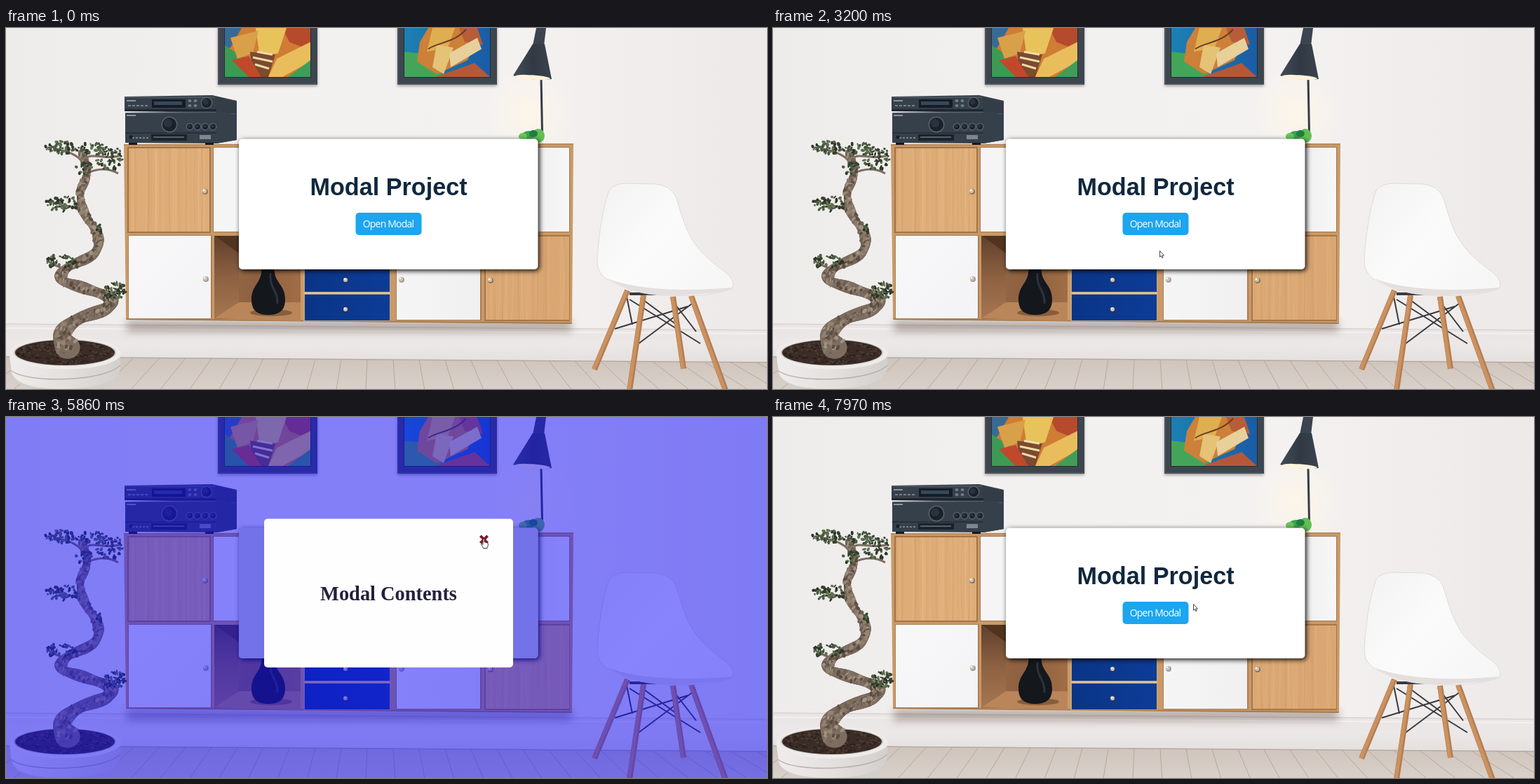
These frames come from a looping animation (1085 px wide and 516 px high, 8 s). An HTML page with a canvas:

```html
<!DOCTYPE html>
<html lang="en">
<head>
<meta charset="utf-8">
<title>Modal Project</title>
<style>
html, body { margin: 0; width: 100%; height: 100%; overflow: hidden; background: #eeecea; }
canvas { display: block; }
</style>
</head>
<body>
<canvas id="stage" width="1085" height="516"></canvas>
<script>
const W = 1085, H = 516, LOOP = 8000;
const stage = document.getElementById('stage').getContext('2d');
let g = stage;
let seed = 7;
const rnd = () => (seed = seed * 16807 % 2147483647) / 2147483647;

function layer(draw) {
  const c = document.createElement('canvas');
  c.width = W; c.height = H;
  g = c.getContext('2d');
  draw();
  g = stage;
  return c;
}
function rect(x, y, w, h, fill) { g.fillStyle = fill; g.fillRect(x, y, w, h); }
function round(x, y, w, h, r, fill) {
  g.fillStyle = fill;
  g.beginPath(); g.roundRect(x, y, w, h, r); g.fill();
}
function oval(x, y, rx, ry, fill, turn = 0) {
  g.fillStyle = fill;
  g.beginPath(); g.ellipse(x, y, rx, ry, turn, 0, 7); g.fill();
}
function shape(d, fill, stroke, width = 1) {
  const p = new Path2D(d);
  if (fill) { g.fillStyle = fill; g.fill(p); }
  if (stroke) { g.strokeStyle = stroke; g.lineWidth = width; g.stroke(p); }
}
function fade(x0, y0, x1, y1, ...colors) {
  const f = g.createLinearGradient(x0, y0, x1, y1);
  colors.forEach((c, i) => f.addColorStop(i / (colors.length - 1), c));
  return f;
}
function glow(x, y, r, inner, outer) {
  const f = g.createRadialGradient(x, y, 0, x, y, r);
  f.addColorStop(0, inner); f.addColorStop(1, outer);
  rect(x - r, y - r, 2 * r, 2 * r, f);
}
function text(s, x, y, font, color, spacing = '0px') {
  g.font = font; g.fillStyle = color; g.textAlign = 'center';
  g.letterSpacing = spacing;
  g.fillText(s, x, y);
}

function room() {
  rect(0, 0, W, H, fade(0, 0, W, 0, '#eeeceb', '#f3f1f0', '#f4f2f1', '#ece9e8'));
  glow(748, 120, 65, 'rgba(255,246,230,.8)', 'rgba(255,246,230,0)');
  // skirting and floor
  shape('M0 423 L1085 432 V478 L0 470Z', fade(0, 424, 0, 478, '#e9e5e4', '#ece8e7', '#e4e0de'));
  shape('M0 423 L1085 432', null, '#d8d3d1', 1.5);
  shape('M0 429 L1085 437', null, '#f3f0ef', 2);
  shape('M0 470 L1085 478 V516 H0Z', fade(0, 470, 0, 516, '#cec4bc', '#d9d0c9'));
  shape('M0 470 L1085 478', null, '#b5aaa2', 1.5);
  for (let x = -40; x < 1130; x += 37) {
    const lean = (x - 530) * .13, top = 470 + x * .0074;
    shape(`M${x} ${top} L${x + lean} 516`, null, '#b0a59c', .9);
  }
  g.save();
  g.filter = 'blur(6px)';
  rect(172, 418, 634, 16, 'rgba(95,75,65,.42)');
  g.restore();
}

function wood(x, y, w, h, base) {
  rect(x, y, w, h, base);
  g.save();
  g.beginPath(); g.rect(x, y, w, h); g.clip();
  for (let i = 0; i < w / 3; i++) {
    const gx = x + rnd() * w, bend = rnd() * 8 - 4;
    shape(`M${gx} ${y} q${bend} ${h / 2} 0 ${h}`, null,
      rnd() < .5 ? 'rgba(190,130,80,.09)' : 'rgba(245,210,165,.12)', 2);
  }
  g.restore();
}
function knob(x, y) {
  oval(x + 1, y + 1, 4, 4, 'rgba(70,50,40,.45)');
  oval(x, y, 3, 3, '#cbc4ba');
  oval(x - 1, y - 1, 1.2, 1.2, '#fff');
}
function cabinet() {
  shape('M168 166 L809 165 L807 423 L171 417Z', '#c99a68');
  shape('M168 167 L809 166', null, '#b5875a', 1.5);
  shape('M172 416 L806 422', null, '#a77b50', 2);
  rect(173, 170, 119, 123, '#a47348');
  wood(175, 172, 115, 119, '#deac77');
  rect(295, 170, 509, 122, '#a1764f');
  rect(296, 171, 120, 120, '#f6f5f6');
  rect(690, 171, 113, 120, fade(758, 0, 803, 0, '#f1f0f0', '#f8f7f7'));
  rect(174, 296, 120, 120, '#ad8056');
  rect(175, 297, 117, 118, fade(175, 297, 292, 415, '#f9f8f9', '#f3f2f4'));
  // open shelf with vase
  rect(297, 297, 123, 119, fade(297, 0, 420, 0, '#9a6b47', '#8d6040', '#a06d45'));
  shape('M297 297 L332 322 V392 L297 415Z', fade(0, 297, 0, 415, '#5f402b', '#8d6142', '#a57650'));
  shape('M297 297 H420 L416 322 H332Z', '#51341f');
  shape('M297 415 L332 392 H420 V419Z', '#b98559');
  oval(378, 407, 30, 5, 'rgba(60,35,15,.4)');
  shape('M364 340 H383 C380 364 398 365 398 388 C398 405 388 410 374 410 C360 410 350 405 350 388 C350 366 367 364 364 340Z', '#14171c');
  shape('M377 350 C375 372 388 374 387 394', null, '#2c333c', 3);
  // lower right half
  rect(424, 300, 124, 119, '#c4a47c');
  rect(426, 300, 121, 77, fade(426, 0, 547, 0, '#0a3586', '#0d3c97'));
  rect(426, 381, 121, 37, fade(426, 0, 547, 0, '#0a3586', '#0d3c97'));
  rect(425, 378, 123, 2, '#dcc49c');
  rect(556, 297, 122, 121, '#a97d55');
  rect(557, 297, 119, 120, fade(557, 0, 677, 0, '#f6f5f6', '#f1f0f1'));
  rect(682, 296, 122, 123, '#a87645');
  wood(684, 298, 119, 119, '#daa773');
  [[283, 233], [284, 358], [484, 360], [484, 402], [563, 359], [690, 360]].forEach(k => knob(...k));
}

function dial(x, y, r) {
  oval(x, y, r + 1.5, r + 1.5, '#56616c');
  oval(x, y, r, r, '#1b2129');
  oval(x - r * .2, y - r * .2, r * .6, r * .6, '#2a333d');
}
function stereo() {
  shape('M169 98 L294 96 L329 104 V123 L300 121 L169 119Z', '#36404b');
  shape('M299 98 L329 108 V122 L299 119Z', '#333d48');
  shape('M169 99 H298', null, '#5c6670', 1);
  rect(170, 116, 130, 3, '#20262e');
  rect(208, 102, 48, 12, '#161c24');
  rect(211, 105, 40, 5, '#34495a');
  for (let i = 0; i < 5; i++) rect(174 + i * 6, 110, 4, 2, '#77818b');
  for (let i = 0; i < 4; i++) oval(262 + i % 2 * 8, 104 + (i >> 1) * 7, 2.5, 2, '#707d88');
  rect(172, 103, 13, 2, '#8d969f');
  dial(286, 107, 7);
  shape('M170 121 L300 120 L329 123 V160 L300 165 L170 164Z', '#36404b');
  shape('M300 120 L329 124 V160 L300 165Z', '#35404b');
  shape('M170 121.5 L300 120.5', null, '#59646f', 1);
  rect(172, 124, 13, 2, '#8d969f');
  rect(170, 149, 130, 2, '#29313a');
  dial(233, 138, 10);
  for (let i = 0; i < 4; i++) dial(262 + i * 11, 141, 4);
  rect(207, 152, 51, 9, '#1b222a');
  rect(210, 155, 44, 2, '#55616c');
  rect(276, 153, 16, 6, '#7c8791');
  for (let i = 0; i < 5; i++) rect(180 + i * 5, 156, 3, 2, '#77818b');
  oval(178, 156, 2.5, 2.5, '#181e25');
  rect(175, 164, 12, 3, '#15191f');
  rect(284, 164, 12, 3, '#15191f');
}

function frame(x, paint) {
  g.save();
  g.shadowColor = 'rgba(60,50,45,.45)'; g.shadowBlur = 4; g.shadowOffsetY = 2;
  rect(x, -10, 142, 91, '#3d464f');
  g.restore();
  shape(`M${x + 1} 0 V80 H${x + 141}`, null, '#4f5963', 1.5);
  g.save();
  g.beginPath(); g.rect(x + 10, 0, 122, 70); g.clip();
  g.translate(x + 10, 0);
  paint();
  g.restore();
  g.strokeStyle = '#252c34'; g.lineWidth = 1;
  g.strokeRect(x + 9.5, -2, 123, 72.5);
}
// loose colour fields only
function warmPaint() {
  rect(0, 0, 122, 70, '#cf7c35');
  shape('M0 0 H24 L8 28 L0 30Z', '#386a94');
  shape('M0 25 L30 44 L40 70 H0Z', '#3c9a54');
  shape('M82 0 H122 V32 L92 20Z', '#b64a2c');
  shape('M44 0 H88 L76 36 L50 42Z', '#e8c25a');
  shape('M8 14 L48 4 L40 36 L18 44Z', '#d9a04a');
  shape('M36 34 L72 38 L62 70 H40Z', '#7b4a31');
  shape('M74 44 L122 20 V48 L82 70 H62Z', '#e9bd5c');
  shape('M90 70 L122 46 V70Z', '#3f9d58');
  shape('M10 46 L34 40 L52 70 H34Z', '#c0492c');
  shape('M46 34 l22 4 M40 42 l28 6 M43 52 l20 6', null, '#f0dca6', 3);
}
function coolPaint() {
  rect(0, 0, 122, 70, fade(0, 0, 122, 0, '#1c80b4', '#1a5ca5'));
  shape('M0 34 L38 38 L56 70 H0Z', '#44a55a');
  shape('M44 70 L100 50 L122 70Z', '#b5583a');
  shape('M34 0 H80 L104 16 L90 46 L46 66 L18 48 L22 20Z', '#cc8038');
  shape('M40 0 H72 L62 28 L32 34Z', '#dfae50');
  shape('M78 0 H104 L112 24 L86 20Z', '#b75d38');
  shape('M46 24 L70 28 L56 66 L40 56Z', '#e4c276');
  shape('M64 36 L104 14 L110 30 L66 56Z', '#e8d09a');
  shape('M34 30 C48 20 70 22 88 2', null, '#693c27', 2);
}

function lamp() {
  shape('M763 72 L764.5 150', null, '#343c45', 3);
  shape('M756 0 H770 L767 25 H751Z', '#3b444f');
  shape('M751 23 H768 L778 73 Q750 76 723 68Z', fade(724, 0, 778, 0, '#424c58', '#313943', '#3a434e'));
  oval(751, 70.5, 25, 3.2, '#fff3dc', .07);
  oval(746, 157, 13, 10, '#3aa34b');
  oval(759, 154, 9, 10, '#61bf54');
  oval(737, 155, 6, 5, '#6ac65c');
  oval(752, 151, 6, 5, '#207d43');
}

function leaves(x, y, rx, ry, n) {
  const greens = ['#35402f', '#4b5a42', '#5f7050', '#2b3526'];
  for (let i = 0; i < n; i++) {
    const a = rnd() * 6.3, d = Math.sqrt(rnd());
    oval(x + Math.cos(a) * d * rx, y + Math.sin(a) * d * ry, 1.3 + rnd() * 2.2, 1 + rnd() * 1.4,
      greens[i % 4], rnd() * 3);
  }
}
function bonsai() {
  // pot
  shape('M18 484 L22 512 Q84 530 150 512 L163 484Z', '#d3cfcd');
  shape('M5 468 L8 492 Q14 516 84 516 Q156 514 163 488 V466Z', fade(5, 0, 163, 0, '#efedeb', '#e3e0de', '#d3cfcd'));
  shape('M8 490 C30 508 140 506 163 482', null, '#b7b2af', 1.5);
  oval(84, 465, 80, 23, '#eeecea');
  oval(84, 464, 73, 19, '#c9c4bf');
  oval(84, 464, 71, 18, '#3a2c26');
  for (let i = 0; i < 170; i++) {
    const a = rnd() * 6.3, d = Math.sqrt(rnd());
    oval(84 + Math.cos(a) * d * 68, 464 + Math.sin(a) * d * 16, 2, 1.2, i % 2 ? '#4e3c32' : '#2a201c');
  }
  // branches and trunk
  shape('M108 190 C95 175 80 178 66 170 M110 188 C125 176 140 190 164 182 M114 208 Q140 196 160 208 M108 264 Q92 248 66 258 M88 345 Q72 342 58 332 M128 310 L135 286 M146 390 Q150 378 162 372', null, '#7d6d60', 3);
  const pts = [[108, 178], [116, 207], [106, 236], [112, 265], [131, 297], [125, 323], [87, 343],
    [80, 360], [112, 372], [148, 386], [143, 401], [103, 416], [80, 437], [88, 457]];
  const at = i => pts[Math.max(0, Math.min(pts.length - 1, i))];
  const curve = (a, b, c, d, u) => .5 * (2 * b + (c - a) * u + (2 * a - 5 * b + 4 * c - d) * u * u + (3 * b - a - 3 * c + d) * u ** 3);
  const bark = ['#6f6056', '#877767', '#a39282', '#5b4c42', '#94836f'];
  for (const rough of [false, true])
    for (let s = 0; s < pts.length - 1; s += .03) {
      const i = Math.floor(s), u = s - i;
      const [x, y] = [0, 1].map(n => curve(at(i - 1)[n], at(i)[n], at(i + 1)[n], at(i + 2)[n], u));
      const r = 5 + s * .45 + Math.sin(s * 5) + (s > 11.5 ? (s - 11.5) * 4 : 0);
      if (rough) oval(x + (rnd() - .5) * r * 1.5, y + (rnd() - .5) * r, 1 + rnd() * 2, 2 + rnd() * 2.5, bark[Math.floor(rnd() * 5)], rnd());
      else oval(x, y, r, r * .9, '#7d6d60');
    }
  leaves(80, 171, 24, 9, 50);
  leaves(123, 173, 20, 9, 34);
  leaves(147, 186, 19, 18, 60);
  leaves(110, 200, 15, 9, 20);
  leaves(80, 251, 24, 11, 55);
  leaves(77, 334, 22, 10, 45);
  leaves(155, 376, 15, 14, 50);
  leaves(134, 288, 5, 6, 10);
}

function chair() {
  const leg = (a, b, c, d) => {
    shape(`M${a} ${b} L${c} ${d}`, null, '#b27c53', 8);
    shape(`M${a - 1} ${b} L${c - 1} ${d}`, null, '#cb925f', 5);
  };
  shape('M868 430 L972 398 M889 388 L990 451 M902 451 L978 394 M885 384 L893 424 M948 387 L984 434 M905 386 L960 427', null, '#3a3a3e', 2);
  leg(951, 384, 966, 487);
  leg(886, 375, 839, 488);
  leg(909, 382, 889, 518);
  leg(977, 383, 1026, 518);
  shape('M889 380 H983', null, '#3a3a3e', 4);
  shape('M860 232 Q866 223 884 222 L926 223 Q947 225 955 241 C971 292 974 312 1027 350 Q1041 362 1035 373 Q1000 385 950 382 C902 383 878 370 857 359 Q843 350 843 334 C845 291 852 254 860 232Z',
    fade(843, 240, 1000, 380, '#f4f3f3', '#fbfbfb', '#f7f6f6'), '#dedbda', 1);
  shape('M858 358 C895 373 960 378 1036 371 Q1028 380 950 382 C902 382 878 370 858 358Z', '#e2dfde');
}

function card() {
  g.save();
  g.shadowColor = 'rgba(0,0,0,.95)';
  g.shadowBlur = 7; g.shadowOffsetX = 2; g.shadowOffsetY = 2;
  round(332, 158.5, 426.5, 186.5, 5, '#fff');
  g.restore();
}

const scene = layer(() => {
  room();
  frame(302, warmPaint);
  frame(558, coolPaint);
  lamp();
  cabinet();
  stereo();
  bonsai();
  chair();
  card();
  text('Modal Project', 545.5, 239, 'bold 34.2px "Liberation Sans", Arial, sans-serif', '#10283d');
});
const dimmed = layer(() => {
  g.drawImage(scene, 0, 0);
  rect(0, 0, W, H, 'rgba(20,15,255,.5)');
  round(332, 158.5, 426.5, 186.5, 5, '#7372e8');
  round(368, 145.5, 355, 212.5, 5, '#fefefe');
  text('Modal Contents', 545.5, 262, 'bold 28.4px "Liberation Serif", Times, serif', '#23213d');
});

// pointer path: time, x, y
const path = [
  [450, 1079, 511], [590, 1064, 501], [790, 1064, 501], [1080, 870, 503], [1350, 620, 489], [1560, 513, 479],
  [1630, 513, 479], [1900, 522, 410], [2200, 544, 305], [2390, 549, 290], [2460, 548, 288],
  [2990, 548, 288], [3200, 551, 318], [3470, 551, 318], [3680, 551, 288],
  [4690, 551, 288], [4880, 572, 358], [5120, 640, 300], [5330, 690, 200], [5440, 685, 186],
  [5510, 683, 200], [5720, 681, 183], [5860, 681, 174], [6100, 681, 179], [6270, 680, 202],
  [6340, 680, 202], [6840, 682, 184], [7090, 685, 178],
  [7490, 685, 179], [7690, 685, 179], [7970, 599, 267]
];
function pointer(t) {
  const i = path.findIndex(p => p[0] > t);
  if (i < 0) return path[path.length - 1].slice(1);
  const [t0, x0, y0] = path[i - 1], [t1, x1, y1] = path[i], u = (t - t0) / (t1 - t0);
  return [x0 + (x1 - x0) * u, y0 + (y1 - y0) * u];
}

const overButton = [[2230, 3060], [3610, 4230]];
const overClose = [[5720, 6130], [6860, 7490]];
const clamp = v => Math.max(0, Math.min(1, v));
const inside = (spans, t) => spans.some(([a, b]) => t >= a && t < b);
const hover = (spans, t, ms) => Math.max(...spans.map(([a, b]) =>
  t < a ? 0 : t < b ? clamp((t - a) / ms) : clamp((b - a) / ms) * clamp(1 - (t - b) / ms)));
const mix = (a, b, k) => `rgb(${a.map((v, i) => Math.round(v + (b[i] - v) * k))})`;

function button(k) {
  const blue = [29, 165, 239], white = [255, 255, 255];
  if (k) round(497, 262.5, 97, 35, 6, mix(white, [178, 178, 180], k));
  round(498.5, 264, 94, 32, 5, mix(blue, white, k));
  text('Open Modal', 545, 285.3, '14px "Open Sans", "Noto Sans", sans-serif', mix(white, [20, 150, 228], k), '-0.8px');
}
function closeIcon(k) {
  const r = 4.8 + .7 * k, x = 681.5, y = 175;
  shape(`M${x - r} ${y - r} L${x + r} ${y + r} M${x + r} ${y - r} L${x - r} ${y + r}`,
    null, mix([35, 31, 64], [232, 22, 10], k), 3.9);
}
function arrow(x, y) {
  g.save();
  g.translate(x, y);
  shape('M.5 .5 V9.3 L2.3 7.6 L3.8 10.7 L5.2 10 L3.8 7.1 H6.5Z', '#fff', '#333', .9);
  g.restore();
}
function hand(x, y) {
  g.save();
  g.translate(x, y);
  shape('M-1 8.5 V1.6 Q-1 .5 0 .5 Q1.1 .5 1.1 1.6 V5 Q2.8 4.3 3 5.5 Q4.6 4.8 4.9 6.1 Q6.3 5.7 6.3 7.4 V9.5 Q6.2 11.3 5 12.2 V13.7 H-.4 Q-1.2 11.3 -3.4 8.7 Q-3.8 7.5 -2.7 7.4 Q-1.8 7.5 -1 8.5Z', '#fff', '#333', 1);
  g.restore();
}

function draw(t) {
  const open = t >= 4230 && t < 7490;
  g.drawImage(open ? dimmed : scene, 0, 0);
  if (open) closeIcon(hover(overClose, t, 300));
  else button(t > 4230 ? 0 : hover(overButton, t, 140));
  if (t < 450) return;
  const [x, y] = pointer(t);
  const click = t >= 4160 && t < 4230 || t >= 7430 && t < 7490;
  if (click) oval(x - .5, y + 1.5, 9, 9, 'rgba(255,250,0,.6)');
  const point = inside(overButton, t) || inside(overClose, t) || t >= 4230 && t < 4690;
  (point ? hand : arrow)(x, y);
}

const start = performance.now();
function tick() {
  draw((performance.now() - start) % LOOP);
  requestAnimationFrame(tick);
}
tick();
</script>
</body>
</html>
```
